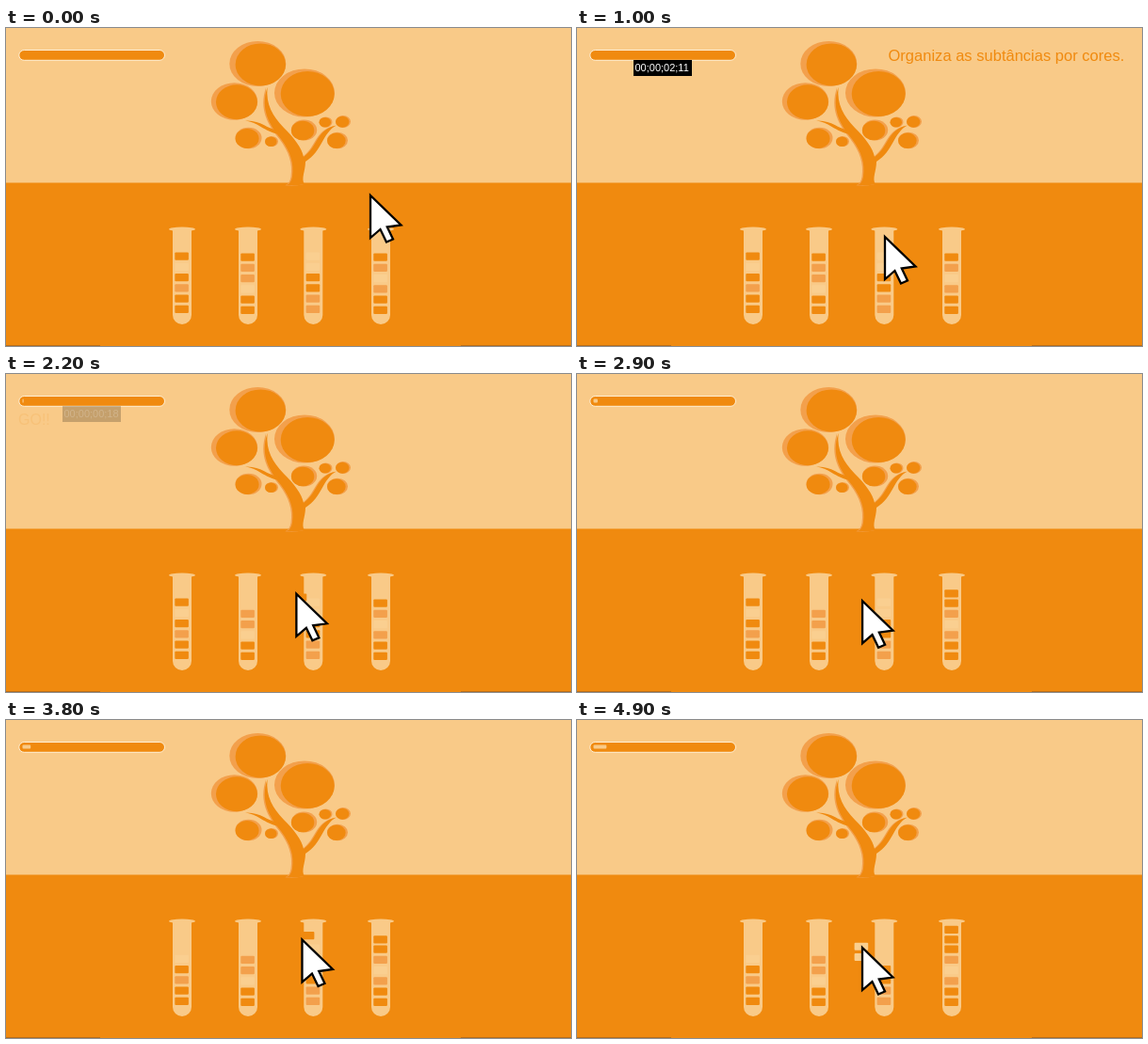
Recreate the animation shown at these times as an HTML page with a canvas. Size 600 by 338 pixels, loop 5000 ms.

```html
<!DOCTYPE html>
<html lang="pt">
<head>
<meta charset="utf-8">
<title>Tubos</title>
<style>
html, body { margin: 0; width: 100%; height: 100%; overflow: hidden; background: #f9ca88; }
canvas { display: block; width: 600px; height: 338px; }
</style>
</head>
<body>
<canvas id="stage" width="600" height="338"></canvas>
<script>
const ctx = document.getElementById('stage').getContext('2d');
const LOOP = 5000, STEP = 100;
const LIGHT = '#f9ca88', DARK = '#f08a0f', MID = '#f3a04c', PALE = '#facf90';
const FONT = '"Liberation Sans", Arial, sans-serif';
const TITLE = 'Organiza as subtâncias por cores.';
const GO_AT = 1955;

// Tree crowns: centre and half width
const CROWNS = [
  [267.3, 38, 30], [242.5, 78, 24.7], [317, 69, 32],
  [316.5, 108.5, 13.7], [339.5, 100, 7], [358, 99.5, 8],
  [352, 119.5, 11], [257.5, 117, 14], [282, 120.5, 7]
];

// Tube centre and the fill of each slot, top to bottom
const TUBES = [[187, 'dpdmdd'], [257, 'dmmpdd'], [326.3, 'ppddmm'], [398, 'dmpmdd']];
const FILLS = { d: DARK, m: MID, p: PALE };

// Moments when blocks are picked up and dropped
const PICK_A = 1950, DROP_A = 2600, PICK_B = 3290, DROP_B = 4100, PICK_C = 4740;

// Cursor stops: time, x, y
const STOPS = [
  [0, 387, 177], [1000, 327, 221], [1500, 292.5, 238],
  [PICK_A, 253, 239], [DROP_A, 397, 229],
  [PICK_B, 181, 246], [DROP_B, 393, 229], [DROP_B + 100, 393, 229],
  [PICK_C, 327, 243], [LOOP, 288, 240.5]
];

const DRAGS = [
  { tube: 0 + 1, slot: 0, from: PICK_A, to: DROP_A },
  { tube: 0, slot: 0, from: PICK_B, to: DROP_B },
  { tube: 2, slot: 0, from: PICK_C, to: LOOP },
  { tube: 2, slot: 1, from: PICK_C, to: LOOP }
];

const clamp = v => Math.min(1, Math.max(0, v));

// The hand sweeps evenly sideways and settles early in height
function cursorAt(t) {
  const i = STOPS.findIndex(s => s[0] > t);
  const [t0, x0, y0] = STOPS[i - 1], [t1, x1, y1] = STOPS[i];
  const k = (t - t0) / (t1 - t0);
  return [x0 + (x1 - x0) * k, y0 + (y1 - y0) * Math.sqrt(k)];
}

function ellipse(x, y, rx, ry, fill) {
  ctx.fillStyle = fill;
  ctx.beginPath();
  ctx.ellipse(x, y, rx, ry, 0, 0, Math.PI * 2);
  ctx.fill();
}

function pill(x, y, w, h, r, fill) {
  ctx.fillStyle = fill;
  ctx.beginPath();
  ctx.roundRect(x, y, w, h, r);
  ctx.fill();
}

function text(str, x, y, size, fill) {
  ctx.font = size + 'px ' + FONT;
  ctx.fillStyle = fill;
  ctx.fillText(str, x, y);
}

const TRUNK = new Path2D(
  'M298 167 Q303 165 304 158 C306 143 302 132 292 118 C279 102 270 86 277.5 63' +
  'C276 82 283 93 295 106 C306 117 314 127 316 137 C331 127 329 108 351 103.5' +
  'C336 111 336 131 318 142 C318 152 313 160 317 166 Q308 168 298 167 Z');
const BRANCH = new Path2D('M254 98.5 C270 97.5 277 107 289 109 L293 113 C275 112 270 100.5 254 98.5 Z');
const ARROW = new Path2D('M0 1 L0 46 L10.5 37 L17 50.5 L24 47.5 L17.8 34.5 L32.5 32.5 Z');

function drawTree() {
  ctx.save();
  ctx.translate(-1.5, .3);
  ctx.fillStyle = MID;
  ctx.fill(TRUNK);
  ctx.restore();
  ctx.fillStyle = DARK;
  ctx.fill(TRUNK);
  ctx.fill(BRANCH);
  // Large crowns are lit from the left, small ones from the right
  for (const [x, y, r] of CROWNS) {
    const side = r > 20 ? 1 : -1;
    ellipse(x, y, r, r * .8, MID);
    ellipse(x + side * r * .1, y + r * .03, r * .89, r * .75, DARK);
  }
}

// Odd tubes hang one pixel lower
const slotPos = (n, i) => [TUBES[n][0] - .4, 242.7 + n % 2 + i * 11.25];

function block([x, y], kind) {
  pill(x - 7.3, y - 4.1, 14.6, 8.2, 1, FILLS[kind]);
}

function drawTubes(t, tip) {
  TUBES.forEach(([x, slots], n) => {
    ellipse(x, 213.8, 14, 2.3, LIGHT);
    pill(x - 10, 213, 20, 102, [2, 2, 10, 10], LIGHT);
    [...slots].forEach((kind, i) => {
      if (!DRAGS.some(d => d.tube === n && d.slot === i && t >= d.from))
        block(slotPos(n, i), kind);
    });
  });
  DRAGS.forEach((d, i) => {
    if (t < d.from) return;
    const home = slotPos(d.tube, d.slot), grip = cursorAt(d.from);
    const held = home.map((v, axis) => v + tip[axis] - grip[axis]);
    const [x, y] = slotPos(3, 0);
    block(t < d.to ? held : [x, y - 10.4 * (i + 1)], TUBES[d.tube][1][d.slot]);
  });
}

function drawBar(t) {
  pill(13.8, 23.5, 154.7, 10.8, 5.4, DARK);
  ctx.strokeStyle = '#fff0d6';
  ctx.lineWidth = 1;
  ctx.stroke();
  const w = (t - GO_AT) * .0047;
  if (w > 0) pill(17.5, 26.5, w, 4, Math.min(1, w / 2), LIGHT);
}

function drawTimecode(t) {
  const alpha = t < STEP ? 0 : clamp((2260 - t) / 290);
  if (!alpha) return;
  const n = Math.floor((t - (t < GO_AT ? 40 : GO_AT)) * .074);
  const two = v => String(v).padStart(2, '0');
  ctx.globalAlpha = alpha;
  pill(60, 34, 62, 17, 0, '#000');
  text(`00;00;${two(Math.floor(n / 30))};${two(n % 30)}`, 61.5, 46, 11, '#fff');
  ctx.globalAlpha = 1;
}

function drawTitle(t) {
  const count = from => Math.floor(clamp((t - from) / 635) * TITLE.length);
  const typed = count(40), erased = count(1095);
  ctx.font = '16.55px ' + FONT;
  const x = 330.5 + ctx.measureText(TITLE.slice(0, erased)).width;
  text(TITLE.slice(erased, typed), x, 35, 16.55, DARK);
  ctx.globalAlpha = clamp((t - 1650) / 150) * clamp((2230 - t) / 230);
  text('GO!!', 13, 54, 16, DARK);
  ctx.globalAlpha = 1;
}

function drawCursor([x, y]) {
  ctx.save();
  ctx.translate(x, y);
  ctx.fillStyle = '#fff';
  ctx.strokeStyle = '#000';
  ctx.lineWidth = 2.3;
  ctx.fill(ARROW);
  ctx.stroke(ARROW);
  ctx.restore();
}

function draw(t) {
  const tip = cursorAt(t);
  pill(0, 0, 600, 338, 0, LIGHT);
  pill(0, 164.4, 600, 173.6, 0, DARK);
  pill(0, 337.3, 100, .7, 0, '#a8641a');
  pill(483, 337.3, 117, .7, 0, '#a8641a');
  drawTree();
  drawBar(t);
  drawTimecode(t);
  drawTitle(t);
  drawTubes(t, tip);
  drawCursor(tip);
}

const start = performance.now();
function tick() {
  const t = (performance.now() - start) % LOOP;
  draw(Math.floor(t / STEP) * STEP);
  requestAnimationFrame(tick);
}
tick();
</script>
</body>
</html>
```
